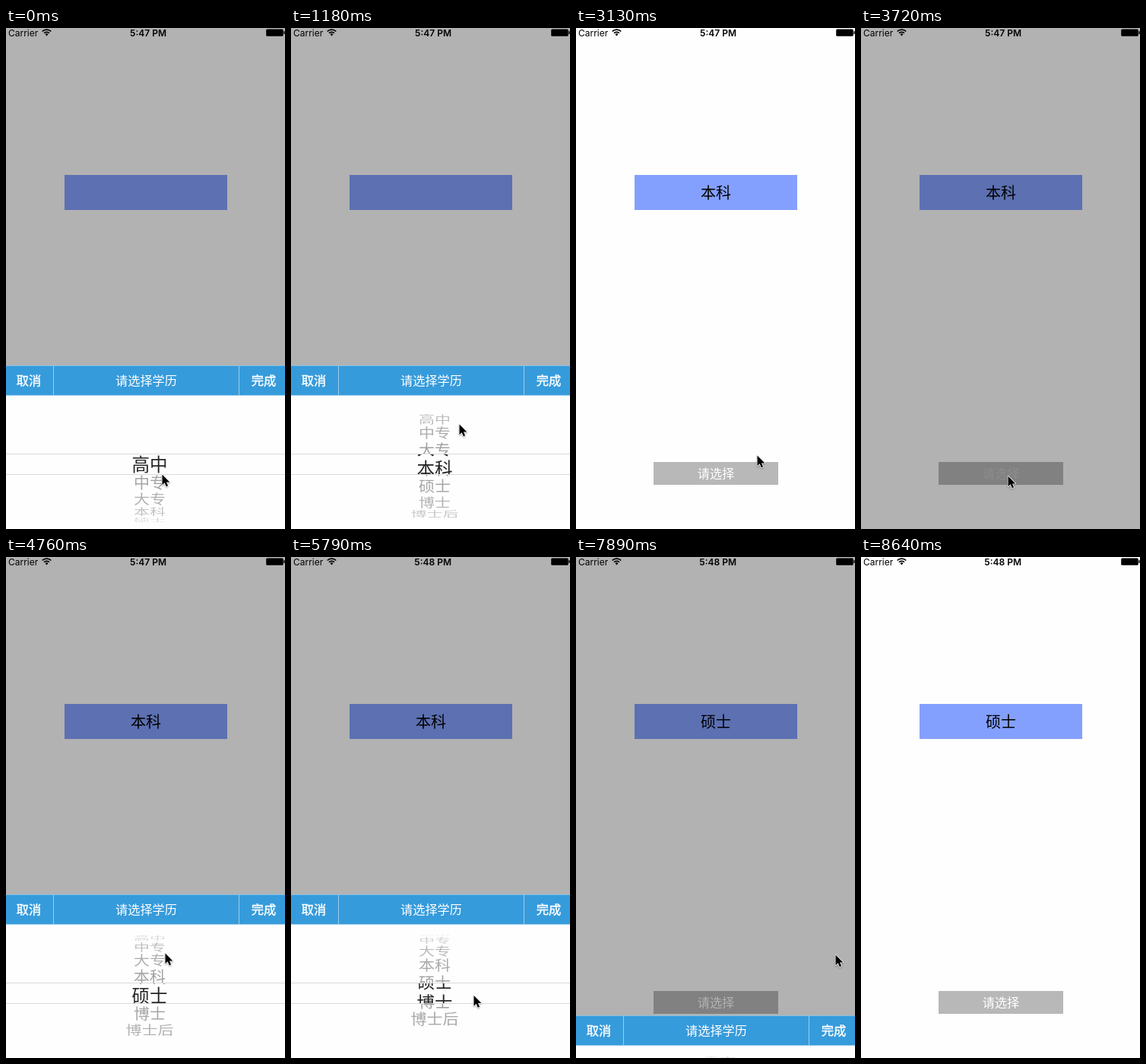
Recreate the animation shown at these times as an HTML page with a canvas. Size 367 by 658 pixels, loop 9140 ms.

```html
<!DOCTYPE html>
<html lang="zh-CN">
<head>
<meta charset="utf-8">
<title>Picker</title>
<style>
html, body { margin: 0; width: 100%; height: 100%; overflow: hidden; background: #fff; }
canvas { display: block; width: 367px; height: 658px; }
</style>
</head>
<body>
<canvas id="stage"></canvas>
<script>
const W = 367, H = 658, LOOP = 9140, STEP = 148.9;
const CJK = '"Noto Sans CJK SC", "Noto Sans CJK", "Noto Sans CJK JP", sans-serif';
const LATIN = 'Inter, Roboto, sans-serif';
const ROWS = ['高中', '中专', '大专', '本科', '硕士', '博士', '博士后'];
const WHEEL = { x: 189, y: 573, radius: 76, angle: 0.3215, zoom: 1.12 };

// Pointer gestures: start step, end step, x, y; it rests in between
const REST = { x: 205, y: 586 };
const MOVES = [
  [1, 7, 221, 520], [11, 13, 291, 458], [14, 17, 349, 459],
  [18, 21, 238, 561], [21, 23, 193, 588], [25, 29, 205, 600],
  [29, 32, 209, 520], [32, 37, 240, 560], [37, 42, 240, 604],
  [43, 47, 303, 496], [48, 50, 348, 460], [51, 55, 334, 584], [55, 58, 337, 662]
];

const canvas = document.getElementById('stage');
const ctx = canvas.getContext('2d');
const dpr = window.devicePixelRatio || 1;
canvas.width = W * dpr;
canvas.height = H * dpr;

const progress = (s, a, b) => Math.min(1, Math.max(0, (s - a) / (b - a)));
const smooth = (s, a, b) => {
  const k = progress(s, a, b);
  return k * k * (3 - 2 * k);
};
const glide = (s, a, b) => 1 - (1 - progress(s, a, b)) ** 2;

// Wheel position in rows: one flick, then a flick with a correction
const scrollAt = s => s < 25
  ? 3 * glide(s, 1, 10.5)
  : 5 * glide(s, 29, 34.7) - glide(s, 37, 45);

const panelAt = s => 1 - smooth(s, 18, 21) + smooth(s, 25, 28) - smooth(s, 51, 54);

function pointerAt(s) {
  return MOVES.reduce((p, [a, b, x, y]) => {
    const k = smooth(s, a, b);
    return { x: p.x + (x - p.x) * k, y: p.y + (y - p.y) * k };
  }, REST);
}

function rect(x, y, w, h, color) {
  ctx.fillStyle = color;
  ctx.fillRect(x, y, w, h);
}

// Chinese text centred on a point; extra thickens the strokes
function label(text, x, y, size, color, extra = 0) {
  ctx.font = `400 ${size}px ${CJK}`;
  ctx.textAlign = 'center';
  ctx.fillStyle = ctx.strokeStyle = color;
  ctx.fillText(text, x, y + size * 0.38);
  if (extra) {
    ctx.lineWidth = extra;
    ctx.strokeText(text, x, y + size * 0.38);
  }
}

function clipped(y, h, draw) {
  ctx.save();
  ctx.beginPath();
  ctx.rect(0, y, W, h);
  ctx.clip();
  draw();
  ctx.restore();
}

function statusBar(clock) {
  ctx.textAlign = 'left';
  ctx.fillStyle = '#000';
  ctx.font = `400 12px ${LATIN}`;
  ctx.fillText('Carrier', 3, 10.5);
  ctx.textAlign = 'right';
  ctx.font = `600 12px ${LATIN}`;
  ctx.fillText(clock, 211, 10.5);

  ctx.strokeStyle = '#000';
  ctx.lineWidth = 1.7;
  for (const r of [5, 8.2]) {
    ctx.beginPath();
    ctx.arc(53.5, 10.3, r, -Math.PI * .75, -Math.PI * .25);
    ctx.stroke();
  }
  ctx.beginPath();
  ctx.moveTo(53.5, 10.6);
  ctx.arc(53.5, 10.3, 2.8, -Math.PI * .75, -Math.PI * .25);
  ctx.fill();

  ctx.beginPath();
  ctx.roundRect(342.2, 1.5, 22.5, 9.3, 1.5);
  ctx.fill();
  rect(365.3, 4.2, 1.4, 3.8, '#000');
}

function wheelRows(pos, zoom, centre) {
  ROWS.forEach((text, i) => {
    const a = (i - pos) * WHEEL.angle;
    if (Math.abs(a) >= Math.PI / 2) return;
    const c = Math.cos(a);
    const alpha = centre ? .86 : .37 * c ** .8;
    ctx.save();
    ctx.translate(WHEEL.x, WHEEL.y + WHEEL.radius * zoom * Math.sin(a));
    ctx.scale(1, c);
    label(text, 0, 0, 21 * zoom, `rgba(0,0,0,${alpha})`);
    ctx.restore();
  });
}

function panel(shown, pos) {
  ctx.save();
  ctx.translate(0, Math.round((1 - shown) * 215));
  rect(0, 443, W, 215, '#fefefe');
  rect(0, 443, W, 39.5, '#369bdb');
  rect(0, 443, W, 1, '#86c3e9');
  rect(62, 444, 1, 38, '#9bcdec');
  rect(306, 444, 1, 38, '#9bcdec');
  label('取消', 30, 463, 16.3, '#fff', .4);
  label('请选择学历', 184.5, 463, 16.2, '#fff');
  label('完成', 339, 463, 16.3, '#fff', .4);

  clipped(483, 76, () => wheelRows(pos, 1, false));
  clipped(587, 71, () => wheelRows(pos, 1, false));
  clipped(560, 26, () => wheelRows(pos, WHEEL.zoom, true));
  rect(0, 559, W, 1, '#dadada');
  rect(0, 586, W, 1, '#dadada');
  ctx.restore();
}

function pointer({ x, y }) {
  ctx.save();
  ctx.translate(x + .5, y + .5);
  ctx.scale(.95, .95);
  ctx.beginPath();
  [[0, 0], [0, 14.5], [3.3, 11.4], [5.6, 16.6], [8, 15.6], [5.8, 10.6], [10.4, 10.4]]
    .forEach(p => ctx.lineTo(...p));
  ctx.closePath();
  ctx.shadowColor = 'rgba(0,0,0,.35)';
  ctx.shadowBlur = 2 * dpr;
  ctx.shadowOffsetY = dpr;
  ctx.strokeStyle = '#fff';
  ctx.lineWidth = 1.6;
  ctx.lineJoin = 'round';
  ctx.stroke();
  ctx.shadowColor = 'transparent';
  ctx.fillStyle = '#000';
  ctx.fill();
  ctx.restore();
}

function draw(time) {
  // The screen refreshes in even steps
  const s = Math.floor((time % LOOP + 20) / STEP);
  const shown = panelAt(s);
  const pressed = s >= 25 && s < 28;
  const choice = s >= 52 ? '硕士' : s >= 19 ? '本科' : '';

  ctx.setTransform(dpr, 0, 0, dpr, 0, 0);
  rect(0, 0, W, H, '#fefefe');
  rect(77, 193, 214, 46, '#84a0ff');
  label(choice, 184, 216, 20, '#000');
  rect(102, 570, 164, 30, '#b8b8b8');
  label('请选择', 184, 585, 16.2, pressed ? '#c8c8c8' : '#fff');
  if (pressed || shown > 0) rect(0, 0, W, H, 'rgba(0,0,0,.3)');
  statusBar(s < 35 ? '5:47 PM' : '5:48 PM');
  if (shown > 0) panel(shown, scrollAt(s));
  if (s < 58) pointer(pointerAt(s));
}

const start = performance.now();
function tick() {
  draw(performance.now() - start);
  requestAnimationFrame(tick);
}
tick();
</script>
</body>
</html>
```
